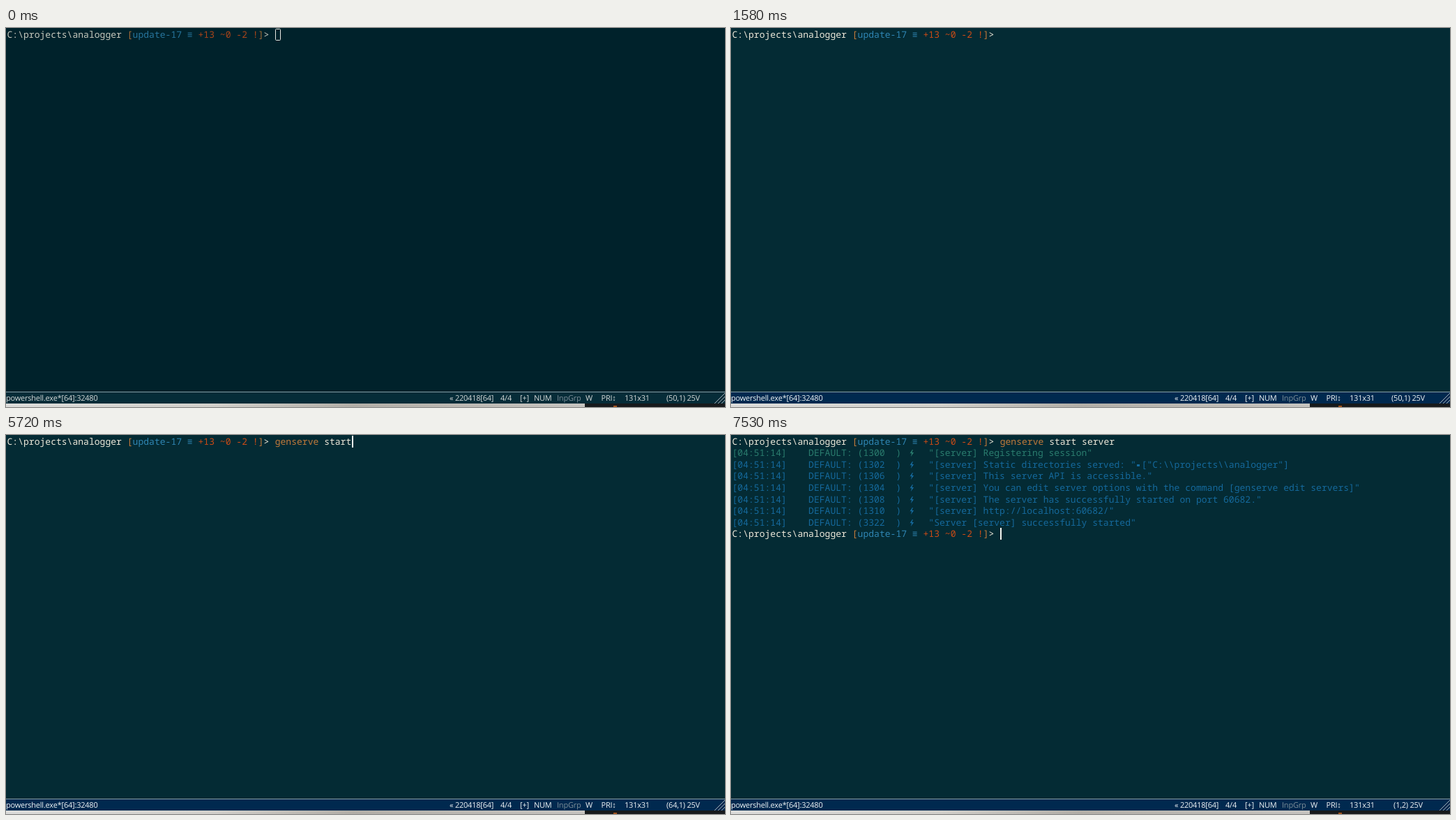
Animation, 1031 px wide and 543 px high, one loop 8000 ms. Source, as an HTML page:

```html
<!DOCTYPE html>
<html lang="en">
<head>
<meta charset="utf-8">
<title>Terminal session</title>
<style>
  html, body { margin: 0; width: 100%; height: 100%; overflow: hidden; background: #042b34; }
  svg { display: block; width: 1031px; height: 543px; }
  text { white-space: pre; text-rendering: geometricPrecision; }
  .mono { font: 13.0667px "Noto Sans Mono", "DejaVu Sans Mono", monospace; font-variant-ligatures: none; }
  .bar { font: 11px "Open Sans", "Noto Sans", sans-serif; letter-spacing: -.22px; fill: #f2f4f6; }
  .bar.dim { fill: #7d8c97; }
  .idle .bar:not(.dim) { fill: #d6d9d8; }
  .idle #term { opacity: .84; }
  #back { fill: #042b34; }
  .idle #back { fill: #00222b; }
  #status { fill: #00294f; }
  .idle #status { fill: #062c38; }
</style>
</head>
<body>
<svg id="stage" viewBox="0 0 1031 543">
  <defs>
    <linearGradient id="strip">
      <stop offset="0" stop-color="#dcdcda"/>
      <stop offset=".36" stop-color="#d2d0cb"/>
      <stop offset=".6" stop-color="#b2aea7"/>
      <stop offset="1" stop-color="#c6c4c0"/>
    </linearGradient>
  </defs>
  <rect id="back" width="1031" height="543"/>
  <g id="term"></g>
  <rect id="caret" width="2" height="17" fill="#f4f4ee"/>
  <rect id="hollow" x="386.5" y="1.5" width="7" height="16" rx="1" fill="none" stroke="#e8e8e2"/>
  <rect id="status" y="522" width="1031" height="16"/>
  <rect y="521" width="1031" height="1" fill="#8b9ca6"/>
  <g id="info"></g>
  <path d="M1016 538l15-15M1021 538l10-10M1026 538l5-5" stroke="#a5b0b8" fill="none"/>
  <rect y="538" width="830" height="5" fill="url(#strip)"/>
  <rect x="830" y="538" width="201" height="5" fill="#171a1c"/>
  <rect x="871" y="541" width="5" height="2" fill="#a0521c"/>
  <g id="mouse">
    <circle r="12" fill="#a36a2f" fill-opacity=".9"/>
    <path d="M.5 1v15l3.4-3.2 2.3 5 2.5-1.1-2.3-4.9h4.8z" fill="#ececec" stroke="#30302c" stroke-width=".7"/>
  </g>
</svg>
<script>
const NS = 'http://www.w3.org/2000/svg';
const $ = id => document.getElementById(id);
const C = { fg: '#eee9da', orange: '#c27a3a', blue: '#2f86b4', red: '#cb4b16',
            green: '#2a7c6e', log: '#15699c' };
const colX = col => 1.5 + col * 7.84;
const rowY = row => Math.floor(row * 16.6);

function add(parent, tag, attrs, text = '') {
  const el = document.createElementNS(NS, tag);
  for (const k in attrs) el.setAttribute(k, attrs[k]);
  el.textContent = text;
  parent.append(el);
  return el;
}

// one terminal line made of coloured runs
function print(parent, row, col, ...runs) {
  const line = add(parent, 'text', { class: 'mono', x: colX(col), y: rowY(row) + 14 });
  return runs.map(([fill, text]) => add(line, 'tspan', { fill }, text));
}
const prompt = (parent, row) => print(parent, row, 0,
  [C.fg, 'C:\\projects\\analogger '], [C.orange, '['], [C.blue, 'update-17 ≡ '],
  [C.red, '+13 ~0 -2 !'], [C.orange, ']'], [C.fg, '>']);

const term = $('term');
prompt(term, 0);
const [command, args] = print(term, 0, 49, [C.orange, ''], [C.fg, '']);

const output = add(term, 'g', {});
`1300  "[server] Registering session"
1302  "[server] Static directories served: " ["C:\\\\projects\\\\analogger"]
1306  "[server] This server API is accessible."
1304  "[server] You can edit server options with the command [genserve edit servers]"
1308  "[server] The server has successfully started on port 60682."
1310  "[server] http://localhost:60682/"
3322  "Server [server] successfully started"`.split('\n').forEach((entry, i) => {
  const [id, message] = entry.split(/  (.*)/);
  const row = i + 1, fill = i ? C.log : C.green;
  print(output, row, 0, [fill, `[04:51:14]    DEFAULT: (${id}  )     ${message}`]);
  add(output, 'path', { d: `M260 ${rowY(row) + 5}l-3.5 5.2h2.6l-1.2 4.8 4.3-6h-2.7l1.4-4z`, fill });
});
add(output, 'rect', { x: 582, y: rowY(2) + 9, width: 4, height: 3, fill: C.log });
prompt(output, 8);

const label = (x, text, kind = '', anchor = 'start') =>
  add($('info'), 'text', { class: 'bar ' + kind, x, y: 534, 'text-anchor': anchor }, text);
label(0, 'powershell.exe*[64]:32480');
label(636, '« 220418[64]');
label(709, '4/4');
label(737, '[+]');
label(757, 'NUM');
label(790, 'InpGrp', 'dim');
label(831, 'W');
label(853.5, 'PRI↕');
label(887, '131x31');
const place = label(971, '', '', 'middle');

const LOOP = 8000, ENTER_MOUSE = 510, FOCUS = 860, LEAVE = 1580;
const RETURN = 7260, MOVED = 7460, DONE = 7530, BLINK = 535;

// bursts of keys: first key, last key, text already there, text typed
const BURSTS = [
  [2860, 3920, '', 'genserve'],
  [4120, 4120, 'genserve', 'r'],
  [4520, 4720, 'genserv', 'e s'],
  [5120, 5790, 'genserve s', 'tart '],
  [5990, 6930, 'genserve start ', 'server']
];
// time and place of the pointer's turning points
const PATH = [[ENTER_MOUSE, 930, 543], [FOCUS, 744, 391], [990, 820, 415], [1190, 820, 415], [1400, 224, 537]];

const clamp = v => Math.max(0, Math.min(1, v));
const show = (el, on) => el.setAttribute('visibility', on ? 'visible' : 'hidden');

function typed(t) {
  const burst = BURSTS.findLast(b => b[0] <= t);
  if (!burst) return '';
  const [from, to, before, keys] = burst;
  const part = to > from ? clamp((t - from) / (to - from)) : 1;
  return before + keys.slice(0, 1 + Math.floor(part * (keys.length - 1)));
}

function pointer(t) {
  const i = PATH.findIndex(p => p[0] > t);
  if (i < 0) return PATH.at(-1).slice(1);
  const [a, b] = [PATH[i - 1], PATH[i]];
  const part = (t - a[0]) / (b[0] - a[0]);
  return [1, 2].map(k => a[k] + (b[k] - a[k]) * part);
}

function draw(t) {
  const idle = t < FOCUS, line = typed(t);
  const [name, rest] = line.split(/(?= .*)/, 1).concat('');
  command.textContent = name;
  args.textContent = rest + line.slice(name.length);
  $('stage').setAttribute('class', idle ? 'idle' : '');
  place.textContent = t < MOVED ? `(${50 + line.length},1) 25V` : '(1,2) 25V';
  show(output, t >= DONE);

  const [row, col] = t >= DONE ? [8, 49] : t >= RETURN ? [1, 0] : [0, 49 + line.length];
  const lit = line || Math.floor((t - FOCUS) / BLINK) % 2 === 0;
  $('caret').setAttribute('x', Math.round(colX(col) + .5));
  $('caret').setAttribute('y', rowY(row) + 1);
  show($('caret'), !idle && lit);
  show($('hollow'), idle);

  const moving = t >= ENTER_MOUSE && t < LEAVE;
  show($('mouse'), moving);
  if (moving) $('mouse').setAttribute('transform', `translate(${pointer(t)})`);
}

const start = performance.now();
function tick() {
  draw((performance.now() - start) % LOOP);
  requestAnimationFrame(tick);
}
tick();
</script>
</body>
</html>
```
